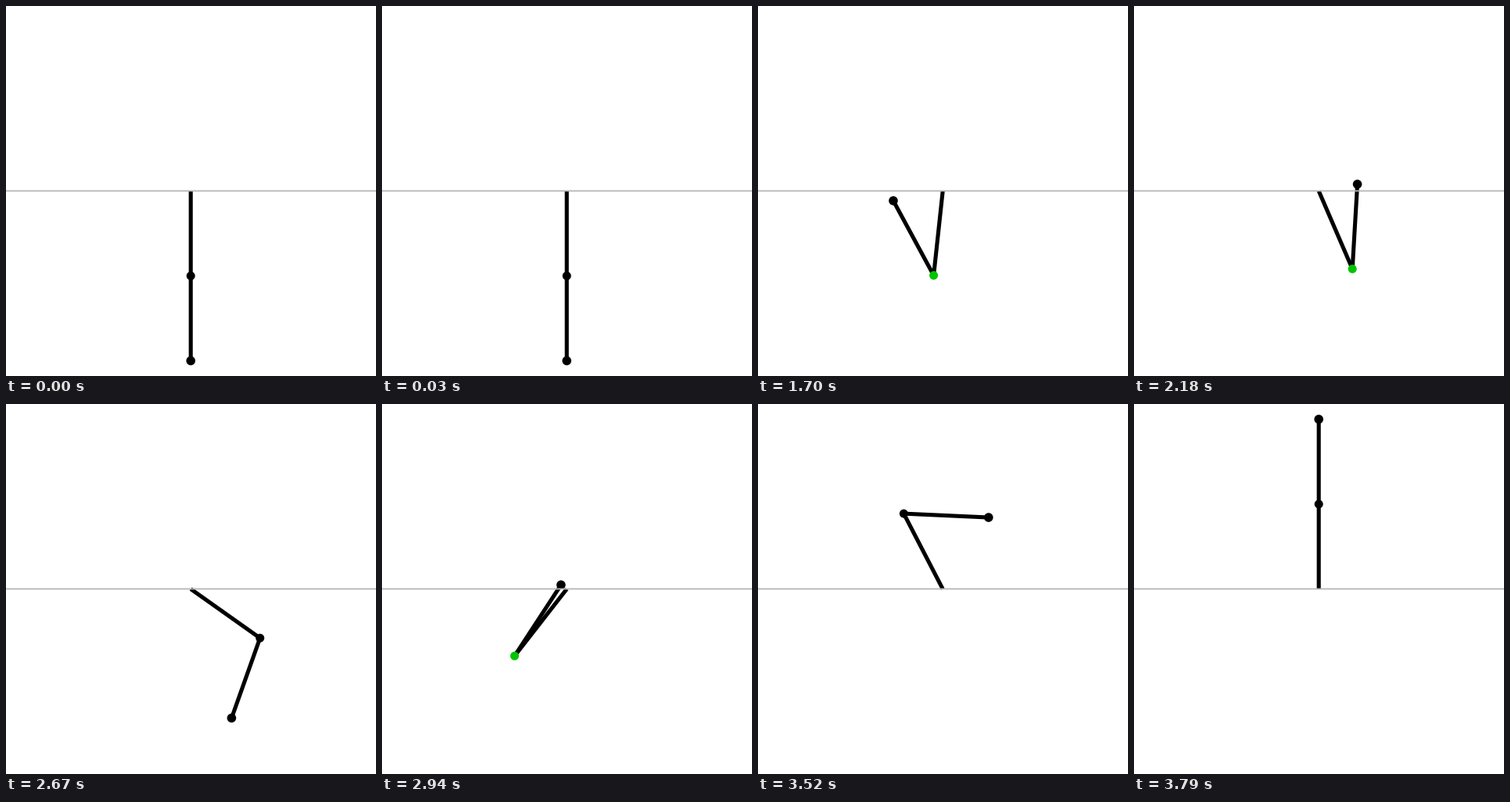
Write a matplotlib script that moves like this. It is 473 px wide and 473 px high and loops after 5060 ms.

```python
import numpy as np
import matplotlib.pyplot as plt
from matplotlib.animation import FuncAnimation
from matplotlib.patches import Circle

SIZE, DPI = 473, 100
LOOP, TICK = 5060, 10
START, END, STEPS = 1300, 3790, 82
PIVOT = np.array([236.2, 236.5])
LINK = 108.5
BLACK, GREEN, GREY = "#000000", "#00c400", "#b6b6b6"

# key poses: time in ms, upper and lower link angle in degrees from straight down
POSES = np.array([
    (1270, 0, 0),               # hanging
    (1300, -1.8, 4),            # first push
    (1480, -27, 95),
    (1700, -5.8, 210),          # folded to the left
    (1840, 0, 231),
    (2180, 23.3, 176.8),        # folded to the right
    (2400, 36.5, 95),
    (2670, 54.2, -21.6),        # unfolded, falling back
    (2790, 26, -99),
    (2910, -26, -194),          # folded again
    (3240, -131.5, -311.5),
    (3450, -146.8, -288.3),     # opening upwards
    (3790, -180, -180),         # standing
])
KNOTS, ANGLES = POSES[:, 0], POSES[:, 1:]
SLOPES = np.gradient(ANGLES, KNOTS, axis=0)


def pose(t):
    """Both angles at time t, by cubic Hermite interpolation."""
    i = min(np.searchsorted(KNOTS, t, side="right") - 1, len(KNOTS) - 2)
    h = KNOTS[i + 1] - KNOTS[i]
    s = (t - KNOTS[i]) / h
    return ((1 + 2 * s) * (1 - s) ** 2 * ANGLES[i]
            + s * (1 - s) ** 2 * h * SLOPES[i]
            + s * s * (3 - 2 * s) * ANGLES[i + 1]
            + s * s * (s - 1) * h * SLOPES[i + 1])


def stepped(ms):
    """Time of the step being shown: the swing moves in even steps."""
    if ms < START:
        return KNOTS[0]
    gap = (END - START) / STEPS
    step = min(int((ms - START) / gap + 0.25), STEPS)
    return START + step * gap


def reach(angle):
    return LINK * np.array([np.sin(angle), np.cos(angle)])


def line(xs, ys, color, width, z):
    return ax.plot(xs, ys, color=color, lw=width * 72 / DPI, zorder=z,
                   solid_capstyle="butt", snap=False)[0]


def dot(radius, z):
    return ax.add_patch(Circle(PIVOT, radius, lw=0, fc=BLACK, zorder=z))


fig = plt.figure(figsize=(SIZE / DPI, SIZE / DPI), dpi=DPI, facecolor="white")
ax = fig.add_axes([0, 0, 1, 1])
ax.set(xlim=(0, SIZE), ylim=(SIZE, 0))
ax.axis("off")

upper = line([], [], BLACK, 5.1, 1)
lower = line([], [], BLACK, 5.1, 1)
tip = dot(5.8, 3)
elbow = dot(5.5, 4)
ground = line([0, SIZE], [236.4, 236.4], GREY, 1.8, 5)


def draw(frame):
    a, b = np.radians(pose(stepped(frame * TICK)))
    joint = PIVOT + reach(a)
    end = joint + reach(b)
    upper.set_data(*zip(PIVOT, joint))
    lower.set_data(*zip(joint, end))
    elbow.center, tip.center = joint, end
    folded = np.cos(b - a) < -0.5
    elbow.set_facecolor(GREEN if folded else BLACK)
    return upper, lower, tip, elbow, ground


anim = FuncAnimation(fig, draw, frames=LOOP // TICK, interval=TICK,
                     init_func=lambda: draw(0), blit=True,
                     repeat=True, repeat_delay=0)
plt.show()
```
